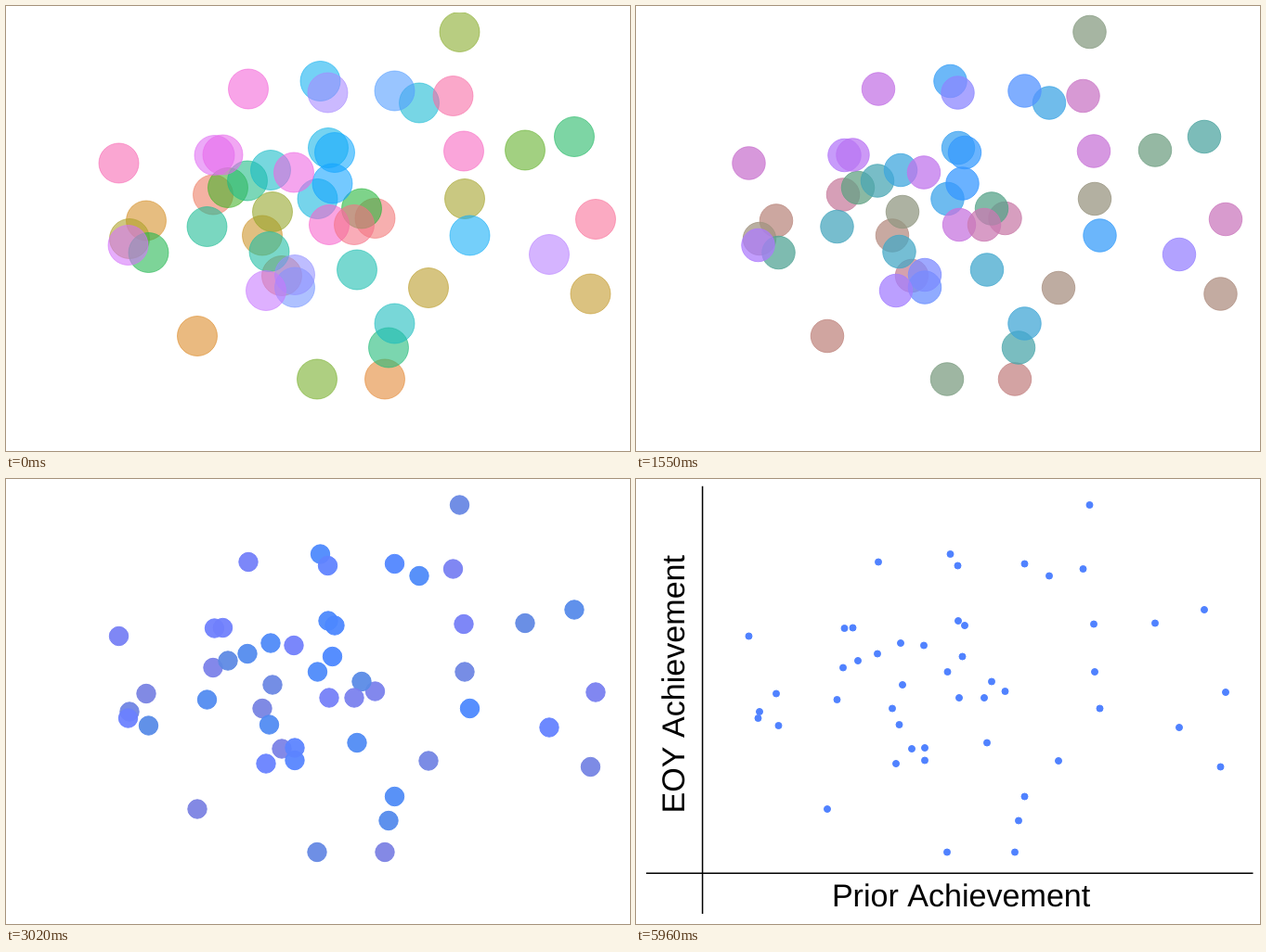
These frames come from a looping animation (672x480 px, 8 s). An HTML page:

```html
<!DOCTYPE html>
<html lang="en">
<head>
<meta charset="utf-8">
<title>Scatter plot</title>
<style>
  html, body { margin: 0; width: 100%; height: 100%; overflow: hidden; background: #fff; }
  svg { display: block; width: 672px; height: 480px; }
  line { stroke: #000; stroke-width: 1.5; }
  text {
    font: 34.1px "Liberation Sans", Arial, sans-serif;
    font-kerning: none;
    text-anchor: middle;
    text-rendering: geometricPrecision;
  }
</style>
</head>
<body>
<svg viewBox="0 0 672 480">
  <clipPath id="panel"><rect y="7" width="672" height="473"/></clipPath>
  <g id="dots" clip-path="url(#panel)"></g>
  <g id="xAxis" visibility="hidden">
    <line x1="11" y1="425.3" x2="664.5" y2="425.3"/>
    <text x="350.1" y="461">Prior Achievement</text>
  </g>
  <g id="yAxis" visibility="hidden">
    <line x1="71.6" y1="7.8" x2="71.6" y2="469"/>
    <text transform="translate(52 221.2) rotate(-90)">EOY Achievement</text>
  </g>
</svg>
<script>
const LOOP = 8000, HOLD = 500, STEP = 70, STEPS = 43;
const LEAD = 3; // steps of the change already done when the loop begins
const X_AXIS_AT = 5120, Y_AXIS_AT = 5960;
const END_COLOR = "#5082ff";

// The plotted data as x, y, in order of hue and stacking
const data = [
  397.5,229, 223,203.5, 297,291, 408,402.5, 206,356, 151,231.5, 276,247.5,
  629.5,310.5, 455,304, 133,251, 494,208, 287,222, 488.5,28, 335,402.5,
  559,155.5, 239,196, 383,218.5, 153.5,266, 612,141, 412,368.5, 260,188.5,
  216.5,238, 283.5,265, 378,284.5, 418.5,342.5, 285,177, 445,104.5, 335.5,208,
  347,153, 338.5,81, 499.5,247.5, 354,158, 351.5,191.5, 418.5,91.5, 311,303.5,
  311,290, 346.5,93.5, 585,268, 280,307, 131.5,258, 224.5,161, 233.5,160.5,
  310,179.5, 261,89.5, 348,236, 493,156.5, 121.5,169.5, 481.5,97, 635,230,
  375,236
];
const count = data.length / 2;

const mix = (a, b, t) => a + (b - a) * t;
const toByte = v =>
  255 * Math.min(1, v <= 0.0031 ? 0 : 1.055 * v ** (1 / 2.4) - 0.055);

// Evenly spaced hues of equal lightness and chroma (polar LUV)
function hueColor(degrees, l = 65, c = 100) {
  const h = degrees * Math.PI / 180;
  const u = c * Math.cos(h) / (13 * l) + 0.1978;
  const v = c * Math.sin(h) / (13 * l) + 0.4683;
  const y = ((l + 16) / 116) ** 3;
  const x = 9 * y * u / (4 * v);
  const z = 3 * y / v - x / 3 - 5 * y;
  const r = 3.24 * x - 1.537 * y - 0.499 * z;
  const g = -0.969 * x + 1.876 * y + 0.042 * z;
  const b = 0.056 * x - 0.204 * y + 1.057 * z;
  return `rgb(${[r, g, b].map(toByte).map(Math.round)})`;
}

const layer = document.getElementById("dots");
const xAxis = document.getElementById("xAxis");
const yAxis = document.getElementById("yAxis");

const dots = Array.from({ length: count }, (_, i) => {
  const node = document.createElementNS("http://www.w3.org/2000/svg", "circle");
  node.setAttribute("cx", data[2 * i]);
  node.setAttribute("cy", data[2 * i + 1]);
  layer.append(node);
  return { node, start: hueColor(15 + 360 * i / count) };
});

function drawDots(step) {
  const p = (step + LEAD) / (STEPS + LEAD);
  const radius = 3.5 + 18.6 * Math.sqrt(1 - p);
  const alpha = mix(0.56, 1, p);
  for (const { node, start } of dots) {
    const color = `color-mix(in lab, ${start}, ${END_COLOR} ${100 * p}%)`;
    node.setAttribute("r", radius);
    Object.assign(node.style, {
      fill: color, stroke: color, fillOpacity: alpha, strokeOpacity: alpha
    });
  }
}

const show = (node, on) => node.setAttribute("visibility", on ? "visible" : "hidden");
let shown = -1;

function render() {
  const t = performance.now() % LOOP;
  const step = t < HOLD ? 0 : Math.min(STEPS, Math.floor((t - HOLD) / STEP) + 1);
  if (step !== shown) drawDots(shown = step);
  show(xAxis, t >= X_AXIS_AT);
  show(yAxis, t >= Y_AXIS_AT);
  requestAnimationFrame(render);
}
render();
</script>
</body>
</html>
```
